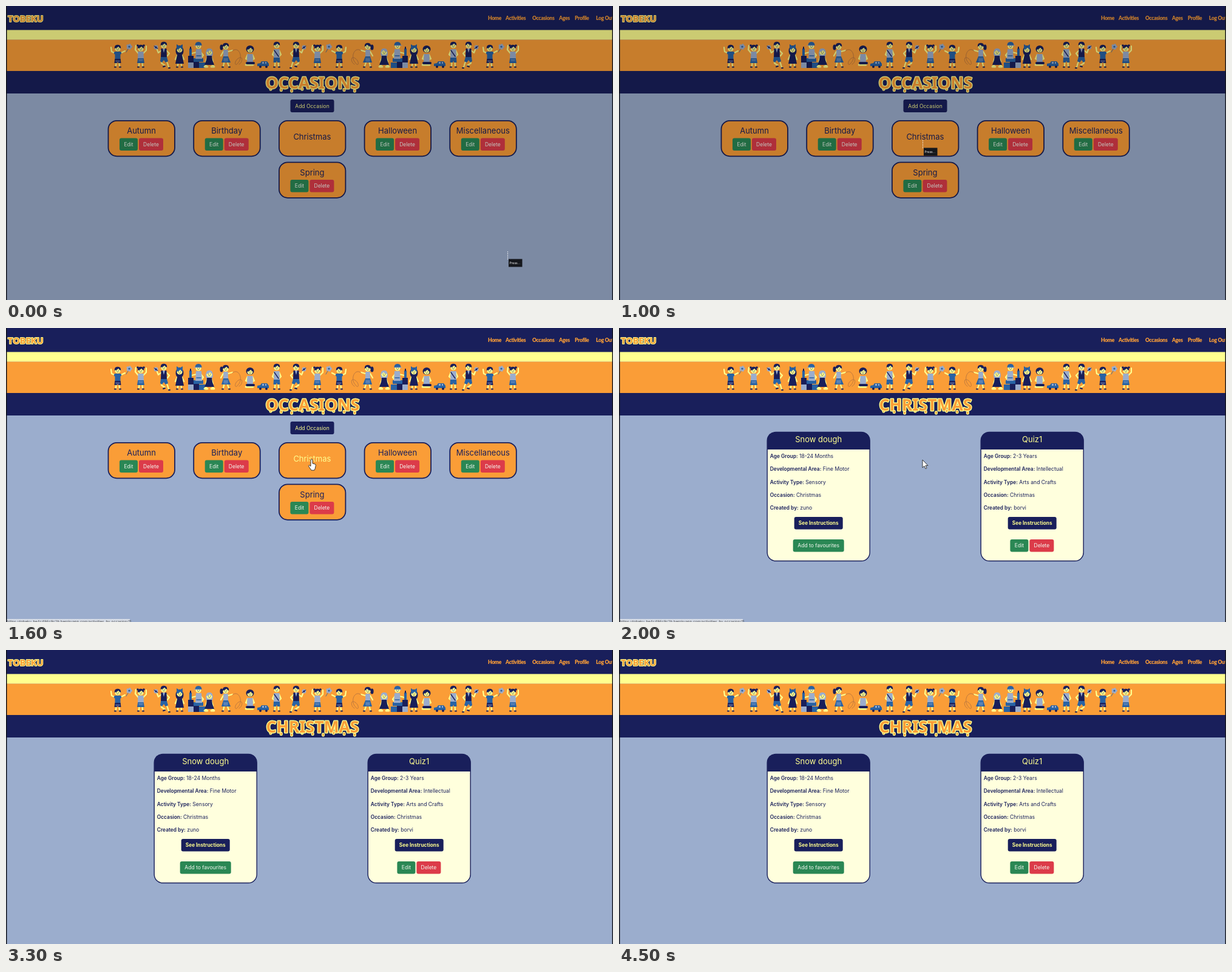
Recreate the animation shown at these times as an HTML page. Size 1000 px wide and 484 px high, loop 4.6 s.

```html
<!DOCTYPE html>
<html lang="en">
<head>
<meta charset="utf-8">
<style>
  html, body { margin: 0; width: 100%; height: 100%; overflow: hidden; background: #9badcd; }
  svg { display: block; width: 100vw; height: 100vh; }
  text { font-family: Inter, "Open Sans", sans-serif; }
  .mid { text-anchor: middle; }
  .fun { font-family: "Noto Sans", "Open Sans", sans-serif; font-weight: 700; fill: #fa9d37; }
  .nav { font-family: Lato, "Open Sans", sans-serif; font-weight: 900; letter-spacing: -.35px; }
  .puffy { stroke: #ffff8f; paint-order: stroke; stroke-linejoin: round; }
  .limb { fill: none; stroke-linecap: round; stroke-linejoin: round; }
</style>
</head>
<body>
<svg id="stage" viewBox="0 0 1000 484" preserveAspectRatio="none"></svg>
<script>
const NAVY = '#191f5b', ORANGE = '#fa9d37', YELLOW = '#ffff8f', SKY = '#9badcd',
      BLUE = '#2862a4', GREEN = '#2a8754', RED = '#dc3b49', CREAM = '#ffffdd';

const rect = (x, y, w, h, fill, more = '') =>
  `<rect x="${x}" y="${y}" width="${w}" height="${h}" fill="${fill}" ${more}/>`;
const oval = (x, y, rx, ry, fill, more = '') =>
  `<ellipse cx="${x}" cy="${y}" rx="${rx}" ry="${ry}" fill="${fill}" ${more}/>`;
const shape = (d, fill, more = '') => `<path d="${d}" fill="${fill}" ${more}/>`;
const limb = (d, color = YELLOW, w = 2.2, more = '') =>
  `<path class="limb" d="${d}" stroke="${color}" stroke-width="${w}" ${more}/>`;
const text = (x, y, size, fill, s, more = 'class="mid"') =>
  `<text x="${x}" y="${y}" font-size="${size}" fill="${fill}" ${more}>${s}</text>`;
const group = (id, body) => `<g id="${id}">${body}</g>`;

// Children in the banner, drawn around x = 0
const face = y => oval(0, y, 4.6, 4.6, YELLOW) + oval(-1.6, y, .5, .7, NAVY) +
  oval(1.6, y, .5, .7, NAVY) + limb(`M-1.3 ${y + 2.2}q1.3 .9 2.6 0`, NAVY, .6);
const hair = (y, c = NAVY) => shape(`M-5.2 ${y}q-.5-6.2 5.2-6.2t5.2 6.2q-2.8-1-3.800-3.200q-2.800 2.800-6.600 3.200z`, c);
const head = (y, c) => face(y) + hair(y, c);
const legs = y => limb(`M-2.4 ${y}L-3 99M2.4 ${y}L3 99`) + limb('M-3 100.500h-2M3 100.500h2', NAVY, 2);
const check = y => limb(`M-3.500 ${y}h7M-3 ${y + 2}h6`, SKY, .7);

const KIDS = {
  cheer: legs(93) + limb('M-4 78L-10 75L-11 68M4 78L12 74') +
    shape('M-5 75H5L6.500 78L4.500 80V88H-4.500V80L-6.500 78z', BLUE) +
    shape('M-4.700 87H4.700L5.500 94H1L0 92L-1 94H-5.500z', NAVY) + check(90) + head(70),
  jump: legs(92) + limb('M-4 78L-9 72L-8 65M4 78L9 73L9 66') +
    shape('M-4.500 75H4.500L5 87H-5z', SKY) + shape('M-4.700 86H4.700L6 94H-6z', BLUE) +
    check(88) + oval(-5, 65, 1.8, 1.8, NAVY) + oval(5, 65, 1.8, 1.8, NAVY) + head(70),
  ball: limb('M-2 88L-4 94L2 98M2 88L6 94L8 101') + limb('M2 99l-3 1M8 102h2', NAVY, 2) +
    limb('M-4 73L-9 77L-11 72M4 73L9 78L6 82') + shape('M-4.500 70H4.500L5 85H-5z', NAVY) +
    shape('M-2 70H2L0 77z', SKY) + shape('M-5 84H5L7 91L3 93L0 89L-3 93L-6 91z', BLUE) + head(65) +
    oval(-13, 68, 3.4, 3.4, SKY) + oval(-13, 68, 1.5, 1.5, NAVY) + limb('M-16 66l2 1M-10 70l-2-1', NAVY, 1),
  bow: oval(0, 74, 6.500, 9, NAVY) + legs(92) + limb('M-4 81L-7 88M4 81L7 88') +
    shape('M-3.500 78H3.500L7 95H-7z', NAVY) + head(72, BLUE) + shape('M0 66L-5 63V68zL5 63V68z', BLUE),
  tower: rect(-14, 93, 9, 9, SKY) + rect(-5, 91, 9, 11, NAVY) + rect(4, 93, 10, 9, BLUE) +
    rect(-14, 82, 9, 11, NAVY) + rect(-5, 86, 16, 6, BLUE) +
    limb('M0 76L-8 78M7 76L11 81L8 85') + shape('M-1 71H8L9 87H-2z', SKY) + limb('M0 82h7', BLUE, 1.4) +
    `<g transform="translate(3)">${face(66)}</g>` +
    shape('M-2.500 65q0-6 5.500-6t5.500 6z', BLUE) + limb('M-4 65H7', SKY, 1.2) +
    rect(-12, 70, 4, 12, BLUE) + rect(-11, 67, 2, 4, NAVY),
  kneel: oval(0, 78, 6, 8, SKY) + limb('M-3 95L-8 100H-3M3 95L8 100H3', YELLOW, 2.8) +
    limb('M-4 85L-6 92M4 85L6 92') + shape('M-4 82H4L5 89L8 97H-8L-5 89z', NAVY) + head(76, SKY),
  skirt: limb('M-2 90L-4 99M2 90L5 99') + limb('M-4 100.500h-2M5 100.500h2', NAVY, 2) +
    limb('M-4 75L-8 82M4 75L11 73') + oval(-7, 68, 2.6, 4.500, NAVY) + shape('M-3.700 72H3.700L4 84H-4z', SKY) +
    shape('M-4 83H4L8 93H-7z', BLUE) + check(86) + check(89) + head(67) +
    limb('M11 74C21 65 30 84 20 94C15 101 13 91 21 86C28 81 29 92 22 96', '#b87540', .9),
  sit: limb('M-4 93L-7 97H5', YELLOW, 2.8) + limb('M-4 80L-7 87L0 89M4 80L7 87L1 89') +
    shape('M-4.500 79H4.500L5 93H-5z', SKY) + limb('M-5 94H6', NAVY, 4) +
    oval(0, 71, 6.500, 6, NAVY) + head(72),
  stand: legs(91) + limb('M-4 73L-7 80L-3 83M4 73L7 80L3 84') + shape('M-4.500 71H4.500L5 86H-5z', SKY) +
    shape('M-5 85H5L5.500 93H1L0 90L-1 93H-5.500z', BLUE) + limb('M-4 73L3 83', NAVY, 1.4) + head(65),
  flower: [0, 1, 2, 3, 4].map(i =>
    oval(3 * Math.cos(i * 1.257), 67 + 3 * Math.sin(i * 1.257), 2, 2, SKY)).join('') +
    oval(0, 67, 1.6, 1.6, BLUE) + limb('M-2 71L-5 76', BLUE, .8),
  car: shape('M-10 99V95L-5 94L-3 91H6L9 95V99z', BLUE) + rect(-2, 92, 3, 3, SKY) + rect(3, 92, 2, 3, SKY) +
    oval(-5, 100, 2, 2, NAVY) + oval(5, 100, 2, 2, NAVY)
};
// A negative place means the figure faces the other way
const ROW = `cheer 184,flower 203,jump 222,ball 260,bow 286,tower 314,kneel 335,skirt 362,sit 402,car 424,
  stand 446,ball -478,jump 513,flower 532,cheer -549,skirt -596,kneel -623,tower -648,bow 672,sit 693,car 715,
  stand 737,ball -762,cheer 797,flower 816,jump 835`;
const banner = ROW.split(',').map(item => {
  const [kind, pos] = item.trim().split(' ');
  return `<g transform="translate(${Math.abs(pos)})${pos < 0 ? 'scale(-1 1)' : ''}">${KIDS[kind]}</g>`;
}).join('');

const button = (cx, y, w, h, fill, label, color = '#f4f8f0', bold = '') =>
  rect(cx - w / 2, y, w, h, fill, 'rx="3"') +
  text(cx, y + h / 2 + 3, bold ? 8.25 : 8.5, color, label, `class="mid" ${bold}`);
const editDelete = (cx, y) =>
  button(cx - 21, y, 30, 20.5, GREEN, 'Edit') + button(cx + 16, y, 40, 20.5, RED, 'Delete');

function heading(s) {
  const edge = `stroke="${YELLOW}" stroke-width="1.2"`;
  let drips = '';
  for (let i = 0; i < 9; i++) drips += oval(436 + i * 17.3, 136.5 + i % 3 * 1.5, 2, 2.6, ORANGE, edge);
  return drips + text(505, 135.500, 26.500, ORANGE, s, 'class="fun puffy mid" stroke-width="2.8"');
}

function occasion(name, cx, y) {
  const plain = name === 'Christmas';
  return rect(cx - 54.5, y + .8, 109.5, 58.5, ORANGE, `rx="14" stroke="${NAVY}" stroke-width="1.8"`) +
    text(cx, y + (plain ? 32 : 22), 13, NAVY, name, `class="mid" ${plain ? 'id="pick"' : ''}`) +
    (plain ? '' : editDelete(cx, y + 29.5));
}

function activity(cx, title, values, foot) {
  const x = cx - 84.5;
  const labels = ['Age Group', 'Developmental Area', 'Activity Type', 'Occasion', 'Created by'];
  return rect(x, 171.5, 169, 212, CREAM, `rx="14" stroke="${NAVY}" stroke-width="1.4"`) +
    shape(`M${x} 200V186q0-14.5 14.5-14.5h140q14.5 0 14.5 14.5V200z`, NAVY) +
    text(cx, 188, 13, YELLOW, title) +
    labels.map((label, i) => text(x + 4.6, 214 + i * 21.25, 8.6, NAVY,
      `<tspan font-weight="600" font-size="8.4">${label}:</tspan> ${values[i]}`, '')).join('') +
    button(cx, 311, 80, 20.5, NAVY, 'See Instructions', YELLOW, 'font-weight="700"') + foot;
}

const nav = [['Home', 794], ['Activities', 823], ['Occasions', 867], ['Ages', 911], ['Profile', 937], ['Log Out', 972]]
  .map(([s, x]) => text(x, 23.3, 8.6, ORANGE, s, 'class="nav"')).join('');

const stage = document.getElementById('stage');
stage.innerHTML =
  rect(0, 0, 1000, 484, SKY) + rect(0, 0, 1000, 40, NAVY) + rect(0, 39.5, 1000, 16, YELLOW) +
  rect(0, 55.5, 1000, 52, ORANGE) + rect(0, 107, 1000, 37, NAVY) +
  text(3, 25.5, 14.6, ORANGE, 'TOBEKU', 'class="fun puffy" stroke-width="2"') + nav + banner +
  group('list', heading('OCCASIONS') + button(504.5, 154, 72, 21, NAVY, 'Add Occasion', YELLOW) +
    ['Autumn', 'Birthday', 'Christmas', 'Halloween', 'Miscellaneous']
      .map((s, i) => occasion(s, 223 + i * 140.7, 188)).join('') + occasion('Spring', 504.4, 256.5)) +
  group('detail', heading('CHRISTMAS') +
    activity(328.7, 'Snow dough', ['18-24 Months', 'Fine Motor', 'Sensory', 'Christmas', 'zuno'],
      button(328.7, 348, 84, 20.5, GREEN, 'Add to favourites')) +
    activity(680.7, 'Quiz1', ['2-3 Years', 'Intellectual', 'Arts and Crafts', 'Christmas', 'borvi'],
      editDelete(680.4, 348))) +
  group('status', rect(0, 479, 204, 5, '#d5dbe5') +
    text(2, 486, 6, '#555', 'https://tobeku-be4c496c9c2b.herokuapp.com/activities_by_occasion/11', '')) +
  group('hand', shape('M502 218q0-2 1.5-2t1.5 2v5l4 1q1.5 .5 1.3 2.2l-1 5-1.3 3h-5l-4-6q-1-2 .5-2.5l2.500 1.800z',
    '#fff', 'stroke="#222" stroke-width=".9"')) +
  group('arrow', shape('M500 217v13l3-2.8 2 4.5 2-1-2-4.3h4z', '#fff', 'stroke="#222" stroke-width=".9"')) +
  rect(0, 0, 1000, 484, '#000', 'id="dim" opacity=".205"') +
  group('cross', limb('M0 0V12', '#fff', 1.2, 'stroke-dasharray=".3 2.6"') +
    rect(1.5, 12, 22.5, 13, '#15171c') + text(3, 20.5, 5, '#fff', 'Press…', '')) +
  rect(0, 0, 1.5, 484, '#15171f') + rect(998.6, 0, 1.4, 484, '#15171f');

const el = id => document.getElementById(id);
const show = (id, on) => { el(id).style.display = on ? '' : 'none'; };
const between = (t, a, b) => t >= a && t < b;

function draw() {
  const t = performance.now() % 4600;
  const dim = t < 1200, page = t >= 1900;
  const k = Math.min(1, Math.max(0, (t - 100) / 800)), ease = k * k * (3 - 2 * k);
  show('dim', dim);
  show('cross', dim);
  el('cross').setAttribute('transform', `translate(${826.5 - 326 * ease} ${404.5 - 183 * ease})`);
  show('list', !page);
  show('detail', page);
  el('pick').setAttribute('fill', dim ? NAVY : YELLOW);
  show('hand', between(t, 1200, 1900));
  show('arrow', between(t, 1900, 2400));
  show('status', between(t, 1300, 2300));
  requestAnimationFrame(draw);
}
draw();
</script>
</body>
</html>
```
